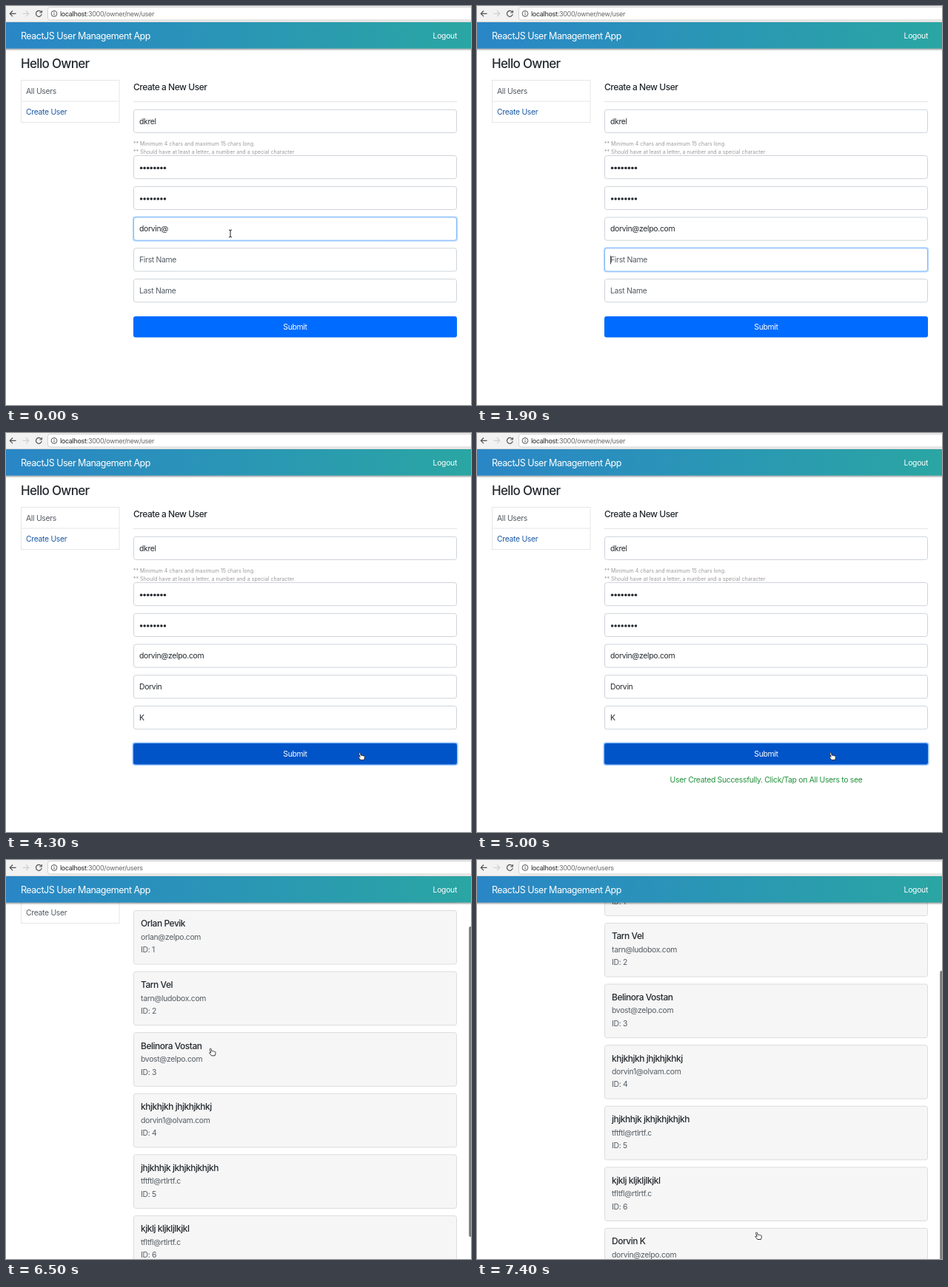
An HTML page that plays this animation: 628x540 px, repeating every 7500 ms.

```html
<!DOCTYPE html>
<html lang="en">
<head>
<meta charset="utf-8">
<title>User management</title>
<style>
  html, body { margin: 0; width: 100%; height: 100%; overflow: hidden; background: #fff; }
  svg { display: block; width: 628px; height: 540px; font: 10.4px Inter, Roboto, sans-serif; letter-spacing: -.03em; fill: #24292e; }
  text { white-space: pre; }
  .brand { font-size: 12.5px; letter-spacing: -.04em; fill: #fff; }
  .hello { font-size: 17px; font-weight: 500; letter-spacing: -.04em; }
  .title { font-size: 12px; font-weight: 500; letter-spacing: -.04em; }
  .white { fill: #fff; }
  .muted { fill: #555c63; }
  .link { fill: #1c5aa5; }
  .hint { font-size: 7.1px; letter-spacing: 0; fill: #999; }
  .url { font-size: 9px; fill: #222; }
  .done { fill: #22903a; }
</style>
</head>
<body>
<svg id="stage" viewBox="0 0 628 540" xmlns="http://www.w3.org/2000/svg"></svg>
<script>
const LOOP = 7500, STEP = 100;
const CLICK = 4200, SAVED = 4400, LIST = 6100, MAX_SCROLL = 137.6;
const stage = document.getElementById('stage');

// Text fields: key times say when each further character appears.
const fields = [
  { y: 140, value: 'dkrel' },
  { y: 202.2, dots: 8 },
  { y: 244, dots: 8 },
  { y: 285.7, value: 'dorvin@zelpo.com', start: 7, focus: [0, 1700],
    keys: [100, 200, 400, 700, 800, 1000, 1200, 1300, 1400] },
  { y: 327.5, value: 'Dorvin', hint: 'First Name', start: 0, focus: [1700, 2800],
    keys: [2000, 2100, 2200, 2300, 2500, 2600] },
  { y: 369.3, value: 'K', hint: 'Last Name', start: 0, focus: [2800, CLICK], keys: [3300] }
];

const users = [
  ['Orlan Pevik', 'orlan@zelpo.com'],
  ['Tarn Vel', 'tarn@ludobox.com'],
  ['Belinora Vostan', 'bvost@zelpo.com'],
  ['khjkhjkh jhjkhjkhkj', 'dorvin1@olvam.com'],
  ['jhjkhhjk jkhjkhjkhjkh', 'tftftl@rtlrtf.c'],
  ['kjklj kljkljlkjkl', 'tfltfl@rtlrtf.c'],
  ['Dorvin K', 'dorvin@zelpo.com']
];

const scrollKeys = [[6300, 0], [6400, 22], [6500, 72], [6600, 122], [6700, 147],
  [6800, 153], [6900, 150.6], [7100, 142], [7300, 138], [7400, MAX_SCROLL]];
const pointerKeys = [[3700, 330, 322], [3900, 400, 372], [4100, 474, 432], [4200, 480, 438],
  [5000, 480, 438], [5300, 330, 320], [5600, 110, 158], [5800, 61, 123], [6100, 61, 123],
  [6400, 240, 236], [6700, 356, 309], [6900, 356, 309], [7100, 366, 390], [7400, 380, 509]];

function at(keys, t) {
  if (t <= keys[0][0]) return keys[0].slice(1);
  const i = keys.findIndex(k => k[0] >= t);
  if (i < 0) return keys[keys.length - 1].slice(1);
  const [a, b] = [keys[i - 1], keys[i]];
  const p = (t - a[0]) / (b[0] - a[0]);
  return a.slice(1).map((v, n) => v + (b[n + 1] - v) * p);
}

const text = (x, y, s, cls = '', more = '') => `<text x="${x}" y="${y}" class="${cls}" ${more}>${s}</text>`;
const box = (x, y, w, h, fill, stroke = 'none', r = 0, more = '') =>
  `<rect x="${x}" y="${y}" width="${w}" height="${h}" rx="${r}" fill="${fill}" stroke="${stroke}" ${more}/>`;
const path = (d, stroke, width = 1, fill = 'none') =>
  `<path d="${d}" fill="${fill}" stroke="${stroke}" stroke-width="${width}" stroke-linejoin="round"/>`;
const middle = 'text-anchor="middle"';

function field(f, t) {
  const focused = f.focus && t >= f.focus[0] && t < f.focus[1];
  const baseline = f.y + 19.7;
  let out = focused ? box(170.8, f.y - 1.2, 439.4, 34.2, '#bfdcff', 'none', 4) : '';
  out += box(172.5, f.y + .3, 436, 31.2, '#fff', focused ? '#80b8fb' : '#ced4da', 3);
  if (f.dots) {
    for (let i = 0; i < f.dots; i++) out += `<circle cx="${182.6 + i * 4.55}" cy="${f.y + 17}" r="1.75"/>`;
    return out;
  }
  const hits = (f.keys || []).filter(k => k <= t);
  const shown = f.keys ? f.value.slice(0, f.start + hits.length) : f.value;
  out += text(180, baseline, shown || f.hint, shown ? '' : 'muted', focused && shown ? 'id="typing"' : '');
  if (focused && t > 0) {
    const since = t - Math.max(f.focus[0], ...hits);
    if (since % 1000 < 500) out += box(180.2, f.y + 10.3, .8, 11.6, '#222', 'none', 0, 'id="caret"');
  }
  return out;
}

function sidebar(listing) {
  return text(20, 83.6, 'Hello Owner', 'hello') +
    box(20.5, 100.5, 132.5, 57, '#fff', '#e4e6e8') + path('M20 129H153', '#e4e6e8') +
    text(27, 118.8, 'All Users', listing ? 'link' : 'muted') +
    text(27, 147.1, 'Create User', listing ? 'muted' : 'link') +
    text(172, 114, listing ? 'All Users' : 'Create a New User', 'title') + path('M172 129.5H609', '#e3e3e3');
}

function form(t, overButton) {
  let out = sidebar(false) +
    text(172, 189.3, '** Minimum 4 chars and maximum 15 chars long.', 'hint') +
    text(172, 199.7, '** Should have at least a letter, a number and a special character', 'hint') +
    fields.map(f => field(f, t)).join('');
  if (t >= CLICK) out += box(170.5, 418.5, 440, 31.4, '#94c1ff', 'none', 4);
  out += box(172, 420, 437, 28.4, overButton ? '#0054c8' : '#006bff', 'none', 3);
  out += text(390.5, 438.2, 'Submit', 'white', middle);
  if (t >= SAVED) out += text(390.5, 472.5, 'User Created Successfully. Click/Tap on All Users to see', 'done', middle);
  return out;
}

function list(scroll) {
  const cards = users.map(([name, mail], i) => {
    const y = 140 + i * 82.6;
    return box(172.5, y + .4, 436, 72.6, '#f6f6f6', '#dcdcdc', 3) +
      text(182, y + 22.4, name, 'title') + text(182, y + 39.9, mail, 'muted') +
      text(182, y + 57.3, 'ID: ' + (i + 1), 'muted');
  }).join('');
  return `<g transform="translate(0 ${-scroll})">${sidebar(true)}${cards}</g>`;
}

function header(shift) {
  return `<g transform="translate(0 ${shift})">` +
    box(-5, 22, 638, 35.5, 'url(#bar)', 'none', 0, 'filter="url(#shade)"') +
    text(20, 44.6, 'ReactJS User Management App', 'brand') +
    text(609, 44.2, 'Logout', 'white', 'text-anchor="end"') + '</g>';
}

function toolbar(route) {
  return box(0, 0, 628, 22, '#f2f2f2') + path('M0 21.5H628', '#d2d2d2') +
    box(56.5, 1.5, 600, 17.5, '#fff', '#d0d0d0', 3) +
    path('M13.5 10.3H5.3M9 6.5L5.2 10.3L9 14.1', '#505050', 1.2) +
    path('M22.5 10.3H30.7M27 6.5L30.8 10.3L27 14.1', '#cfcfcf', 1.2) +
    path('M47.3 7.8A3.9 3.9 0 1 0 48.2 11M48.3 6V9H45.3', '#505050', 1.2) +
    `<circle cx="65" cy="10.4" r="3.9" fill="none" stroke="#555"/>` + path('M65 9.8V12.5M65 8V9', '#555') +
    text(73, 13.7, `localhost<tspan fill="#666">:3000/owner/${route}</tspan>`, 'url');
}

const shapes = {
  beam: path('M-2-5Q0-5 0-3.6Q0-5 2-5M0-4V4M-2 5Q0 5 0 3.6Q0 5 2 5', '#222', 1),
  arrow: path('M-3-5V4.5L-.8 2.5L.8 6L2.3 5.3L.8 2H3.8Z', '#fff', .8, '#111'),
  hand: path('M-3-5c.9-.4 1.5.2 1.7 1l.5 2.4c.6-.5 1.5-.3 1.7.3.6-.5 1.5-.2 1.7.4.9-.4 1.8.2 1.8 1.2 0 1.7-.2 2.6-1 4.2H-1.2c-.6-1.2-1.6-2-2.7-3.4-.5-.8.5-1.5 1.2-1l.9.6-1.6-4.4c-.2-.7 0-1.1.4-1.3z', '#222', .9, '#fff')
};

function pointerKind(x, y, listing) {
  if (x < 172) return x > 20 && x < 153 && y > 100 && y < 158 ? 'hand' : 'arrow';
  if (listing) return 'hand';
  if (y > 420 && y < 449) return 'hand';
  return fields.some(f => y > f.y && y < f.y + 32) ? 'beam' : 'arrow';
}

const defs = `<defs>
  <linearGradient id="bar"><stop stop-color="#2a86c7"/><stop offset="1" stop-color="#2ba6a3"/></linearGradient>
  <filter id="shade" x="-5%" y="-20%" width="110%" height="150%"><feDropShadow dx="0" dy="1.2" stdDeviation="1.3" flood-opacity=".5"/></filter>
</defs>`;

function draw(t) {
  const listing = t >= LIST;
  const [scroll] = at(scrollKeys, t);
  const visible = t < 100 || t >= pointerKeys[0][0];
  const [x, y] = t < 100 ? [303, 308] : at(pointerKeys, t);
  const kind = pointerKind(x, y, listing);
  const overButton = visible && kind === 'hand' && x > 172;

  let out = defs + box(0, 0, 628, 540, '#fff');
  out += listing ? list(scroll) : form(t, overButton);
  out += header(Math.min(0, MAX_SCROLL - scroll));
  if (scroll > 0) out += box(625.2, 24 + 126 * Math.min(1, scroll / MAX_SCROLL), 6, 420, '#7c7c7c', 'none', 2);
  out += toolbar(listing ? 'users' : 'new/user');
  if (visible) out += `<g transform="translate(${x} ${y})">${shapes[kind]}</g>`;
  stage.innerHTML = out;

  const typing = document.getElementById('typing'), caret = document.getElementById('caret');
  if (typing && caret) caret.setAttribute('x', 180.5 + typing.getComputedTextLength());
}

let last = -1;
function tick() {
  const t = Math.floor(performance.now() % LOOP / STEP) * STEP;
  if (t !== last) draw(last = t);
  requestAnimationFrame(tick);
}
tick();
</script>
</body>
</html>
```
